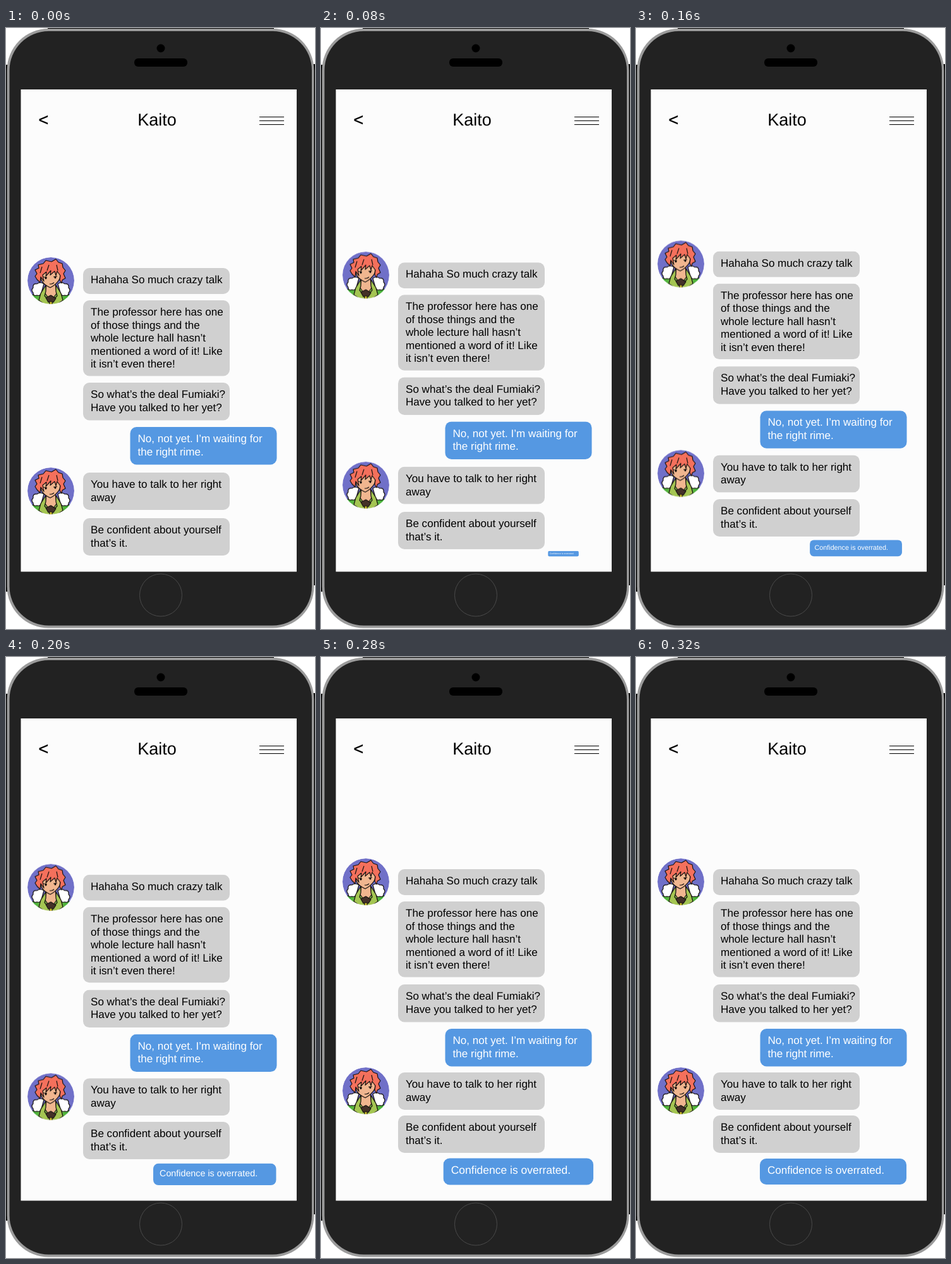
Animation, 489 px wide and 949 px high, one loop 0.64 s. Source, as an HTML page:

```html
<!DOCTYPE html>
<html lang="en">
<head>
<meta charset="utf-8">
<title>Chat</title>
<style>
  html, body { margin: 0; width: 100%; height: 100%; overflow: hidden; background: #fff; }
  svg { display: block; width: 489px; height: 949px; }
  text { font: 17.07px "Liberation Sans", Arial, sans-serif; text-rendering: geometricPrecision; }
  .header { font-size: 27px; }
  .gray rect { fill: #d0d0d0; }
  .blue rect { fill: #5598e2; }
  .blue text { fill: #fff; }
  .ink { stroke: #161210; stroke-width: 1.2; stroke-linejoin: round; }
</style>
</head>
<body>
<svg id="stage" viewBox="0 0 489 949">
  <defs>
    <clipPath id="disc"><circle r="37"/></clipPath>
    <linearGradient id="coat" x1="0" x2="1">
      <stop offset="0" stop-color="#18a52c"/>
      <stop offset=".5" stop-color="#a5c653"/>
      <stop offset="1" stop-color="#12a52a"/>
    </linearGradient>
    <g id="avatar" clip-path="url(#disc)">
      <circle r="37" fill="#7070c8"/>
      <g class="ink">
        <path fill="url(#coat)" d="M-38 29Q-26 18-14 19L14 19Q28 20 38 27V40H-38Z"/>
        <path id="fur" fill="#fff" d="M-11 5Q-17 1-22 5Q-29 4-28 11Q-32 15-28 19Q-28 25-22 23Q-17 25-15 19Z"/>
        <use href="#fur" transform="scale(-1 1)"/>
        <path fill="#f0b68f" d="M-7 5L-9 20L0 33L9 20L7 5Z"/>
        <path id="collar" fill="#a4c552" d="M-8 7L-16 20L-19 31L-9 38H-2L-1 33L-10 24L-8 17Z"/>
        <use href="#collar" transform="scale(-1 1)"/>
        <path fill="#443128" d="M-8 27L0 23L8 28L4 34H-4Z"/>
        <path fill="#d7c72e" d="M-2 33H2V38H-2Z"/>
        <path fill="#f0b68f" d="M-17-13L-15-1Q-12 6-1 11Q9 6 14-3L16-16Z"/>
        <path fill="#f4705c" d="M-22-2L-25-7L-22-11L-25-17L-19-20L-20-25L-12-27L-8-32L1-30L8-34L12-29L18-27L19-21L23-16L20-11L23-4L18-1L17 4L14-1L15-8L10-15L8-8L6-15L-1-9L0-16L-8-7L-7-14L-13-9L-11 1L-16-6L-17 3Z"/>
        <path fill="none" d="M-12-6L-6-5M4-6L10-7M-2 5Q2 6 5 3M-14-22L-17-12M-3-25L-6-16M9-25L11-16"/>
      </g>
      <circle cx="-8" cy="-4" r="1.5"/>
      <circle cx="7" cy="-5" r="1.5"/>
    </g>
  </defs>

  <path d="M66 0H424V4H66ZM0 58H4V890H0ZM485 57H489V880H485Z"/>
  <rect x="1.5" y="1" width="486" height="946.5" rx="66" fill="#9b9b9b"/>
  <rect x="5.5" y="5" width="478.5" height="938.5" rx="62" fill="#222"/>
  <circle cx="245" cy="32" r="6.5"/>
  <rect x="203" y="48" width="84" height="13" rx="6"/>
  <rect x="23.5" y="97" width="436.5" height="761.5" fill="#fcfcfc"/>
  <circle cx="245" cy="895.5" r="33.5" fill="none" stroke="#4a4a4a"/>
  <text class="header" x="51.5" y="154" stroke="#000" stroke-width=".4">&lt;</text>
  <text class="header" x="239" y="154" text-anchor="middle">Kaito</text>
  <path d="M401 140.5H440M401 146.5H440M401 152.5H440" stroke="#000"/>
</svg>
<script>
const stage = document.getElementById("stage");
const LOOP = 640, TICK = 40, START = 80, RISE_STEPS = 5, PEAK = 1.048;
const LINE = 20.5, WIDTH = 232;

function add(parent, tag, attrs, content = "") {
  const node = document.createElementNS("http://www.w3.org/2000/svg", tag);
  for (const key in attrs) node.setAttribute(key, attrs[key]);
  node.textContent = content;
  return parent.appendChild(node);
}

function bubble(kind, x, y, height, lines) {
  const group = add(stage, "g", { class: kind });
  add(group, "rect", { x, y, width: WIDTH, height, rx: 10 });
  lines.forEach((line, i) =>
    add(group, "text", { x: x + 12, y: y + 24.3 + i * LINE }, line));
  return group;
}

function avatar(y) {
  const group = add(stage, "g", {});
  add(group, "use", { href: "#avatar", x: 71, y });
  return group;
}

// Hold each pose for one tick; the last one stays until the loop restarts.
function play(node, poses) {
  const frames = poses.map((transform, i) => ({
    transform,
    offset: i ? (START + (i - 1) * TICK) / LOOP : 0,
    easing: "step-end"
  }));
  frames.push({ transform: poses[poses.length - 1], offset: 1 });
  node.animate(frames, { duration: LOOP, iterations: Infinity });
}

function rise(node, distance) {
  play(node, Array.from({ length: RISE_STEPS + 1 }, (_, i) =>
    `translate(0px, ${-distance * i / RISE_STEPS}px)`));
}

rise(avatar(399), 44);
rise(bubble("gray", 122, 379, 41, ["Hahaha So much crazy talk"]), 44);
rise(bubble("gray", 122, 430, 119.5, [
  "The professor here has one", "of those things and the", "whole lecture hall hasn’t",
  "mentioned a word of it! Like", "it isn’t even there!"]), 44);
rise(bubble("gray", 122, 560, 59.5, ["So what’s the deal Fumiaki?", "Have you talked to her yet?"]), 43);
rise(bubble("blue", 196.5, 630, 59.5, ["No, not yet. I’m waiting for", "the right rime."]), 43);
rise(avatar(731), 46);
rise(bubble("gray", 122, 702, 59, ["You have to talk to her right", "away"]), 46);
rise(bubble("gray", 122, 774, 59, ["Be confident about yourself", "that’s it."]), 50);

// The reply grows from the lower right, overshoots, then settles.
const reply = bubble("blue", -WIDTH / 2, -20.5, 41, ["Confidence is overrated."]);
const pose = (x, y, scale) => `translate(${x}px, ${y}px) scale(${scale})`;
const growth = Array.from({ length: RISE_STEPS + 1 }, (_, i) => {
  const left = RISE_STEPS - i;
  return pose(312.5 + 17.75 * left, 812.5 + 4.4 * left, PEAK * i / RISE_STEPS);
});
play(reply, [...growth, pose(312.25, 812.5, (1 + PEAK) / 2), pose(312, 812.5, 1)]);
</script>
</body>
</html>
```
